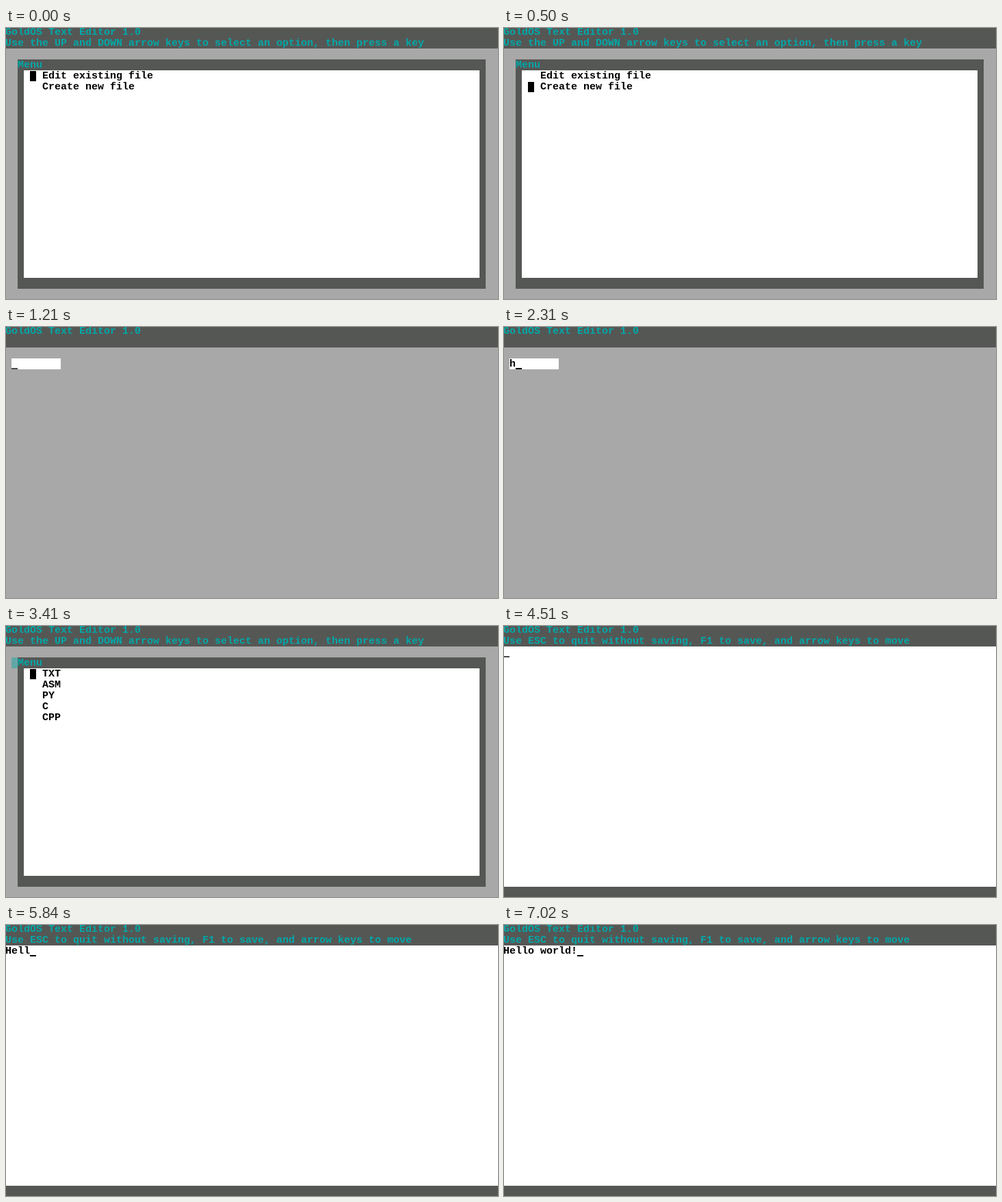
Recreate the animation shown at these times as an HTML page with a canvas. Size 719 by 397 pixels, loop 8000 ms.

```html
<!DOCTYPE html>
<html lang="en">
<head>
<meta charset="utf-8">
<title>Text Editor</title>
<style>
  html, body { margin: 0; width: 100%; height: 100%; overflow: hidden; background: #a8a8a8; }
  canvas { display: block; }
</style>
</head>
<body>
<canvas id="screen" width="719" height="397"></canvas>
<script>
const ctx = document.getElementById('screen').getContext('2d');
const LOOP = 8000;
const CELL_W = 9, CELL_H = 16;
const GRAY = '#a8a8a8', DARK = '#555755', TEAL = '#00a8a8', WHITE = '#fff', BLACK = '#000';

// The 80x25 text grid is cropped by one pixel on the left and two on top.
const colX = col => col * CELL_W - 1;
const rowY = row => row * CELL_H - 2;

function rect(color, x, y, w, h) {
  ctx.fillStyle = color;
  ctx.fillRect(x, y, w, h);
}

function cells(color, col, row, cols, rows) {
  rect(color, colX(col), rowY(row), cols * CELL_W, rows * CELL_H);
}

function print(text, col, row, color) {
  ctx.fillStyle = color;
  [...text].forEach((ch, i) => ctx.fillText(ch, colX(col + i), rowY(row) + 12));
}

function underline(col, row, color) {
  rect(color, colX(col), rowY(row) + 14, CELL_W, 2);
}

function frame(hint) {
  cells(GRAY, 0, 0, 80, 25);
  cells(DARK, 0, 0, 80, 2);
  print('GoldOS Text Editor 1.0', 0, 0, TEAL);
  print(hint, 0, 1, TEAL);
}

function menu(items, selected, marked) {
  frame('Use the UP and DOWN arrow keys to select an option, then press a key');
  cells(DARK, 2, 3, 76, 21);
  cells(WHITE, 3, 4, 74, 19);
  if (marked) cells('#62a8a6', 1, 3, 1, 1);
  print('Menu', 2, 3, TEAL);
  items.forEach((item, i) => print(item, 6, 4 + i, BLACK));
  rect(BLACK, colX(4), rowY(4 + selected) + 1, CELL_W, CELL_H - 1);
}

const countUntil = (times, t) => times.filter(at => t >= at).length;

// Types one character per key time; the cursor may follow on its own times.
function typed(text, col, row, t, keys, cursorKeys = keys) {
  const shown = countUntil(keys, t);
  print(text.slice(0, shown), col, row, BLACK);
  underline(col + countUntil(cursorKeys, t), row, shown ? BLACK : '#484848');
}

function namePrompt(t) {
  frame('');
  cells(WHITE, 1, 3, 8, 1);
  typed('hello', 1, 3, t, [2310, 2380, 2620, 2700, 3010], [2310, 2380, 2620, 2780, 3010]);
}

function editor(t) {
  frame('Use ESC to quit without saving, F1 to save, and arrow keys to move');
  cells(WHITE, 0, 2, 80, 22);
  cells(DARK, 0, 24, 80, 1);
  typed('Hello world!', 0, 2, t,
    [5370, 5450, 5690, 5840, 5920, 6080, 6390, 6550, 6550, 6710, 6790, 7020]);
}

function draw(t) {
  ctx.font = 'bold 15px "Liberation Mono", monospace';
  ctx.textBaseline = 'alphabetic';
  if (t < 1210) menu(['Edit existing file', 'Create new file'], t < 500 ? 0 : 1, false);
  else if (t < 3410) namePrompt(t);
  else if (t < 4510) menu(['TXT', 'ASM', 'PY', 'C', 'CPP'], 0, true);
  else editor(t);
}

const start = performance.now();
function tick() {
  draw((performance.now() - start) % LOOP);
  requestAnimationFrame(tick);
}
tick();
</script>
</body>
</html>
```
